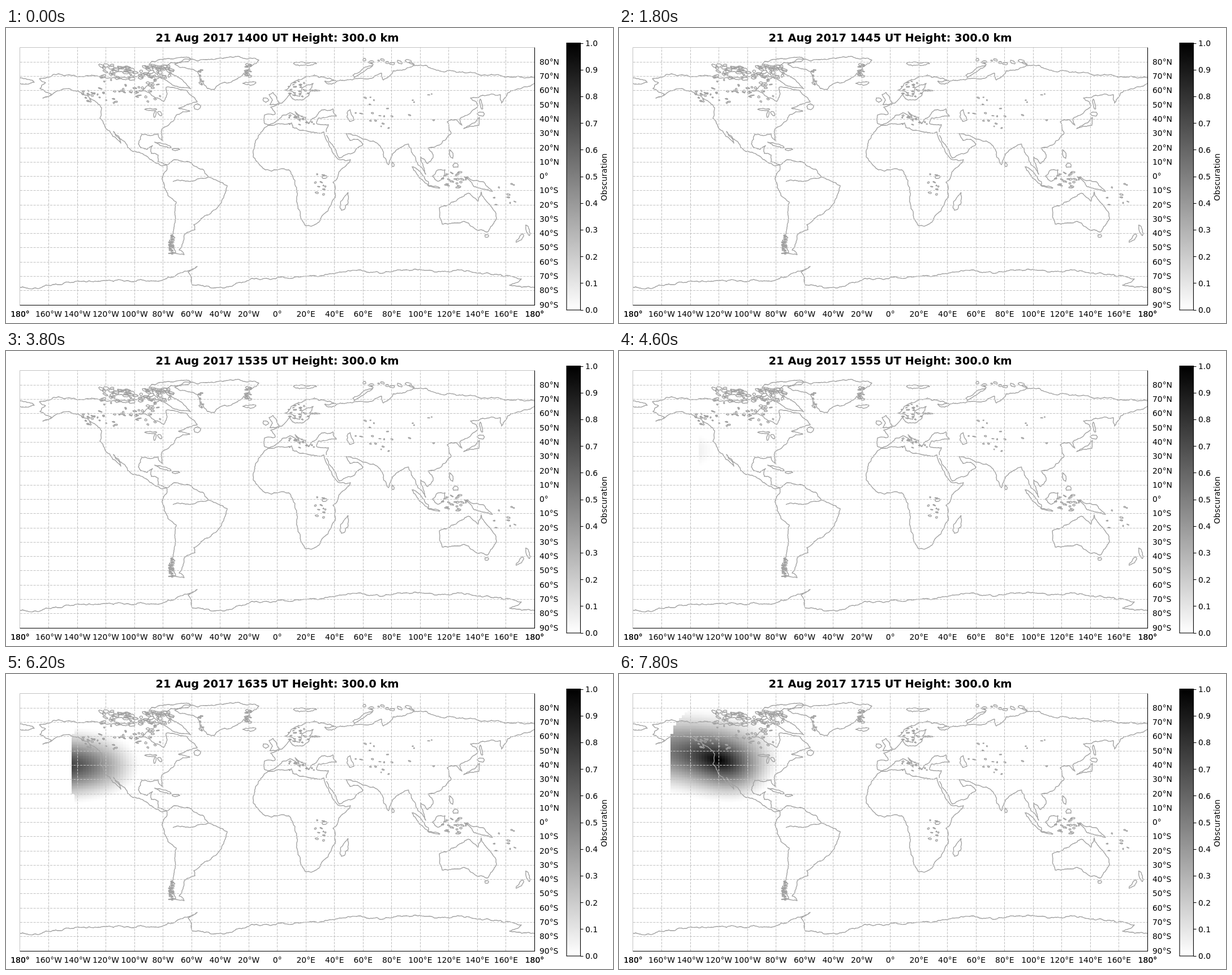
An HTML page with a canvas that plays this animation: 1073x522 px, repeating every 8 s.

```html
<!DOCTYPE html>
<html lang="en">
<head>
<meta charset="utf-8">
<title>Obscuration map</title>
<style>
html, body { margin: 0; width: 100%; height: 100%; overflow: hidden; background: #fff; }
canvas, svg { position: absolute; left: 0; top: 0; display: block; }
text { font: 13.89px "DejaVu Sans", sans-serif; fill: #000; }
.title { font-size: 19.44px; font-weight: bold; }
.grid { fill: none; stroke: #c3c3c3; stroke-width: 1.1; stroke-dasharray: 4.11 1.78; }
.coast { fill: none; stroke: #a2a2a2; stroke-width: 1.4; stroke-linejoin: round; }
.axis { fill: none; stroke: #000; stroke-width: 1.1; }
.pale { fill: none; stroke: #c3c3c3; }
</style>
</head>
<body>
<canvas id="shade" width="1073" height="522"></canvas>
<svg id="map" width="1073" height="522" viewBox="0 0 1073 522">
  <defs><linearGradient id="ramp" x1="0" y1="0" x2="0" y2="1">
    <stop offset="0" stop-color="#000"/><stop offset="1" stop-color="#fff"/>
  </linearGradient></defs>
</svg>
<script>
const STEP = 200, LOOP = 8000, RAD = Math.PI / 180;
const svg = document.getElementById('map');
const ctx = document.getElementById('shade').getContext('2d');
const px = lon => 479.7 + lon * 2.5264;
const py = lat => 262.6 - lat * 2.5275;

function add(tag, attrs, label) {
  const el = document.createElementNS('http://www.w3.org/2000/svg', tag);
  for (const k in attrs) el.setAttribute(k, attrs[k]);
  if (label !== undefined) el.textContent = label;
  return svg.appendChild(el);
}

let seed = 21;
function rand() {
  seed = (seed * 1664525 + 1013904223) % 4294967296;
  return seed / 4294967296;
}

// Splits a segment at a displaced midpoint until the pieces are short.
function crinkle(a, b, out) {
  const dx = b[0] - a[0], dy = b[1] - a[1], len = Math.hypot(dx, dy);
  if (len < 3) { out.push(b); return; }
  const k = (rand() - 0.5) * Math.min(0.28, 5 / len);
  const m = [(a[0] + b[0]) / 2 - dy * k, (a[1] + b[1]) / 2 + dx * k];
  crinkle(a, m, out);
  crinkle(m, b, out);
}

let outline = '';
function trace(pts) {
  const out = [pts[0]];
  for (let i = 1; i < pts.length; i++) crinkle(pts[i - 1], pts[i], out);
  outline += 'M' + out.map(p => p[0].toFixed(1) + ' ' + p[1].toFixed(1)).join('L');
}

function coast(text) {
  const pts = text.replace('z', '').split(' ').map(p => p.split(',').map(Number));
  trace(text.endsWith('z') ? [...pts, pts[0]] : pts);
}

// An uneven island or lake with half axes rx and ry, turned by deg.
function isle(x, y, rx, ry, deg = 0) {
  const c = Math.cos(deg * RAD), s = Math.sin(deg * RAD), pts = [];
  for (let i = 0; i < 8; i++) {
    const r = 0.75 + rand() * 0.5, a = i * Math.PI / 4;
    const u = rx * r * Math.cos(a), v = ry * r * Math.sin(a);
    pts.push([x + u * c - v * s, y + u * s + v * c]);
  }
  trace([...pts, pts[0]]);
}

// Scatters n small islands or lakes in a box.
function specks(x, y, w, h, n, size) {
  while (n--) isle(x + rand() * w, y + rand() * h, size * (0.4 + rand()), size * (0.2 + rand() * 0.5), rand() * 40 - 10);
}

function drawAmericas() {
  coast('242,80 207,91 156,84 84,82 59,90 70,97 60,107 80,117 65,124 101,108 128,112 151,126 169,141 166,160 175,175 189,192 203,204 190,183 211,203 222,217 247,226 276,244');
  coast('284,242 269,237 269,225 257,222 259,208 249,215 234,205 240,188 269,188 276,199 275,181 288,171 301,154 325,147 305,142 338,131 317,110 294,105 283,105 284,119 279,130 257,119 241,111 262,95 272,87 242,80');
  coast('276,244 284,242 284,252 276,268 286,296 301,308 299,341 291,372 300,399 315,401 306,393 313,380 315,366 334,357 332,348 357,331 381,308 391,279 358,264 348,250 320,236 298,233 284,242');
  coast('298,64 328,55 396,51 447,57 428,74 409,90 378,99 368,109 356,107 345,93 339,78 308,70z');
  coast('357,264 322,271 295,272');
  isle(285, 60, 34, 6, -8);
  isle(290, 88, 34, 9, 28);
  isle(204, 82, 18, 5);
  isle(339, 139, 7, 5);
  isle(256, 144, 10, 2);
  isle(263, 152, 6, 2, 100);
  isle(272, 151, 5, 3, 50);
  isle(279, 207, 14, 2, 17);
  isle(299, 215, 7, 2);
  specks(168, 66, 125, 24, 62, 4.5);
  specks(165, 90, 110, 46, 44, 2.6);
  specks(132, 110, 30, 24, 18, 2);
  specks(289, 367, 7, 33, 34, 2.2);
  specks(424, 64, 8, 24, 14, 3);
  specks(341, 74, 8, 26, 12, 2);
}

function drawEurope() {
  coast('466,171 457,169 457,154 476,152 468,140 491,130 501,118 506,125 528,125 539,111 555,111 536,110 543,98 523,107 519,121 506,112 493,110 517,91 545,83 583,93 563,94');
  coast('466,171 488,155 502,150 520,165 511,148 529,158 535,169 545,159 558,145 578,143 584,156 553,159 549,169 570,171 566,184');
  coast('466,136 483,132 472,114 465,118 471,128z');
  isle(459, 127, 5, 4);
  isle(432, 98, 12, 3);
  isle(526, 63, 19, 3);
  isle(630, 76, 22, 3, -32);
  isle(608, 156, 12, 5, 70);
  specks(497, 94, 38, 30, 24, 1.8);
  specks(500, 153, 46, 20, 16, 1.8);
}

function drawAsia() {
  coast('563,94 570,99 591,92 649,88 664,80 667,92 684,76 742,66 767,76 858,82 934,88');
  coast('25,88 50,96 25,98');
  coast('934,98 892,111 876,133 874,118 821,124 834,138 802,162 806,172 795,162 780,166 787,186 768,206 747,212 755,229 745,240 733,228 742,259 728,242 718,221');
  coast('718,221 711,205 685,221 676,242 663,212 649,200 601,187 608,199 622,197 631,206 611,222 589,230 566,190');
  coast('837,158 836,172 809,178 828,168z');
  isle(839, 152, 6, 4);
  isle(840, 136, 9, 2, 80);
  isle(684, 242, 4, 2, 80);
  isle(787, 223, 7, 3, 70);
  isle(795, 243, 5, 4);
  isle(734, 263, 19, 4, 47);
  isle(758, 281, 12, 1.5, 12);
  isle(767, 260, 13, 9, -45);
  specks(770, 255, 45, 30, 22, 2.6);
  specks(600, 56, 130, 8, 10, 4);
  specks(590, 115, 180, 65, 22, 1.8);
}

function drawSouth() {
  coast('464,172 505,168 507,176 519,181 562,184 579,223 590,233 609,233 578,273 582,300 562,329 548,347 530,350 516,319 511,278 500,251 459,251 437,228 443,197z');
  coast('766,318 771,347 810,342 834,358 850,361 867,335 840,290 834,307 820,293 788,308z');
  coast('810,264 843,272 860,289 828,281z');
  coast('25,459 60,460 105,450 218,448 280,445 338,422 322,432 330,455 385,460 435,443 545,438 625,428 665,434 725,427 850,433 911,444 890,455 934,459');
  isle(598, 309, 17, 6, -70);
  isle(563, 264, 4, 3);
  isle(850, 368, 4, 3);
  isle(922, 358, 9, 3, 70);
  isle(909, 372, 10, 3, -45);
  specks(545, 256, 24, 48, 10, 2.2);
  specks(862, 274, 40, 40, 9, 2);
}

function drawGrid() {
  const snap = v => Math.floor(v) + 0.5;
  let d = '';
  for (let lon = -160; lon <= 160; lon += 20) d += `M${snap(px(lon))} 490V35`;
  for (let lat = -80; lat <= 80; lat += 10) d += `M25 ${snap(py(lat))}H934`;
  add('path', { class: 'grid', d });
  add('path', { class: 'pale', d: 'M24.5 490V34.5H934' });
  add('path', { class: 'axis', d: 'M24.5 490.5H934.5V34.5' });
}

function drawLabels() {
  for (let lon = -180; lon <= 180; lon += 20) {
    const side = lon % 180 ? (lon < 0 ? 'W' : 'E') : '';
    const at = { x: px(lon), y: 511, 'text-anchor': 'middle' };
    for (let i = Math.abs(lon) === 180 ? 2 : 1; i > 0; i--) add('text', at, Math.abs(lon) + '°' + side);
  }
  for (let lat = -90; lat <= 80; lat += 10) {
    const side = lat ? (lat < 0 ? 'S' : 'N') : '';
    add('text', { x: 943, y: py(lat) + 4.5 }, Math.abs(lat) + '°' + side);
  }
}

function drawBar() {
  add('rect', { x: 991, y: 27, width: 24.5, height: 472, fill: 'url(#ramp)' });
  add('rect', { class: 'axis', x: 991, y: 26.5, width: 24.5, height: 472.5 });
  for (let i = 0; i <= 10; i++) {
    const y = 499 - i * 47.2;
    add('path', { class: 'axis', d: `M1015.5 ${Math.floor(y) + 0.5}h5` });
    add('text', { x: 1024, y: y + 5 }, (i / 10).toFixed(1));
  }
  add('text', { transform: 'translate(1061.5 264) rotate(-90)', 'text-anchor': 'middle' }, 'Obscuration');
}

// Share of a disc of radius s hidden by a disc of radius m at distance c.
function hidden(s, m, c) {
  if (c >= s + m) return 0;
  if (c <= Math.abs(m - s)) return Math.min(1, m * m / (s * s));
  const a = Math.acos((c * c + s * s - m * m) / (2 * c * s));
  const b = Math.acos((c * c + m * m - s * s) / (2 * c * m));
  const lens = s * s * (a - Math.sin(2 * a) / 2) + m * m * (b - Math.sin(2 * b) / 2);
  return lens / (Math.PI * s * s);
}

// Eclipse geometry in the plane through the Earth's centre, hours from 18:00.
function drawShade(minutes) {
  ctx.clearRect(0, 0, 1073, 522);
  const t = minutes / 60 - 18 + 0.019, R = 1 + 300 / 6371;
  const sx = -0.1296 + 0.54064 * t, sy = 0.4854 - 0.14164 * t;
  const dec = (11.867 - 0.0136 * t) * RAD, mu = 89.245 + 15.0039 * t;
  const sd = Math.sin(dec), cd = Math.cos(dec);
  for (let lon = -170; lon < -50; lon += 2) {
    const h = (lon + mu) * RAD, sh = Math.sin(h), ch = Math.cos(h);
    const x0 = Math.round(px(lon)), x1 = Math.round(px(lon + 2));
    for (let lat = 0; lat < 89; lat++) {
      const sl = Math.sin(lat * RAD), cl = Math.cos(lat * RAD);
      const x = R * cl * sh, y = R * (sl * cd - cl * sd * ch), z = R * (sl * sd + cl * cd * ch);
      if (z < 0 || x * x + y * y > 1) continue;
      const outer = 0.5421 - 0.0046 * z, inner = -0.004 - 0.0046 * z;
      const v = hidden((outer + inner) / 2, (outer - inner) / 2, Math.hypot(x - sx, y - sy));
      if (v <= 0) continue;
      const g = Math.round(255 * (1 - v)), y0 = Math.round(py(lat + 1));
      ctx.fillStyle = `rgb(${g},${g},${g})`;
      ctx.fillRect(x0, y0, x1 - x0, Math.round(py(lat)) - y0);
    }
  }
}

drawAmericas();
drawEurope();
drawAsia();
drawSouth();
add('path', { class: 'coast', d: outline });
drawGrid();
drawLabels();
drawBar();
const title = add('text', { class: 'title', x: 479.6, y: 24, 'text-anchor': 'middle' }, '');

let shown = -1;
function render() {
  const step = Math.floor(performance.now() % LOOP / STEP);
  if (step !== shown) {
    shown = step;
    const minutes = 14 * 60 + step * 5;
    const clock = Math.floor(minutes / 60) + String(minutes % 60).padStart(2, '0');
    title.textContent = `21 Aug 2017 ${clock} UT Height: 300.0 km`;
    drawShade(minutes);
  }
  requestAnimationFrame(render);
}
render();
</script>
</body>
</html>
```
